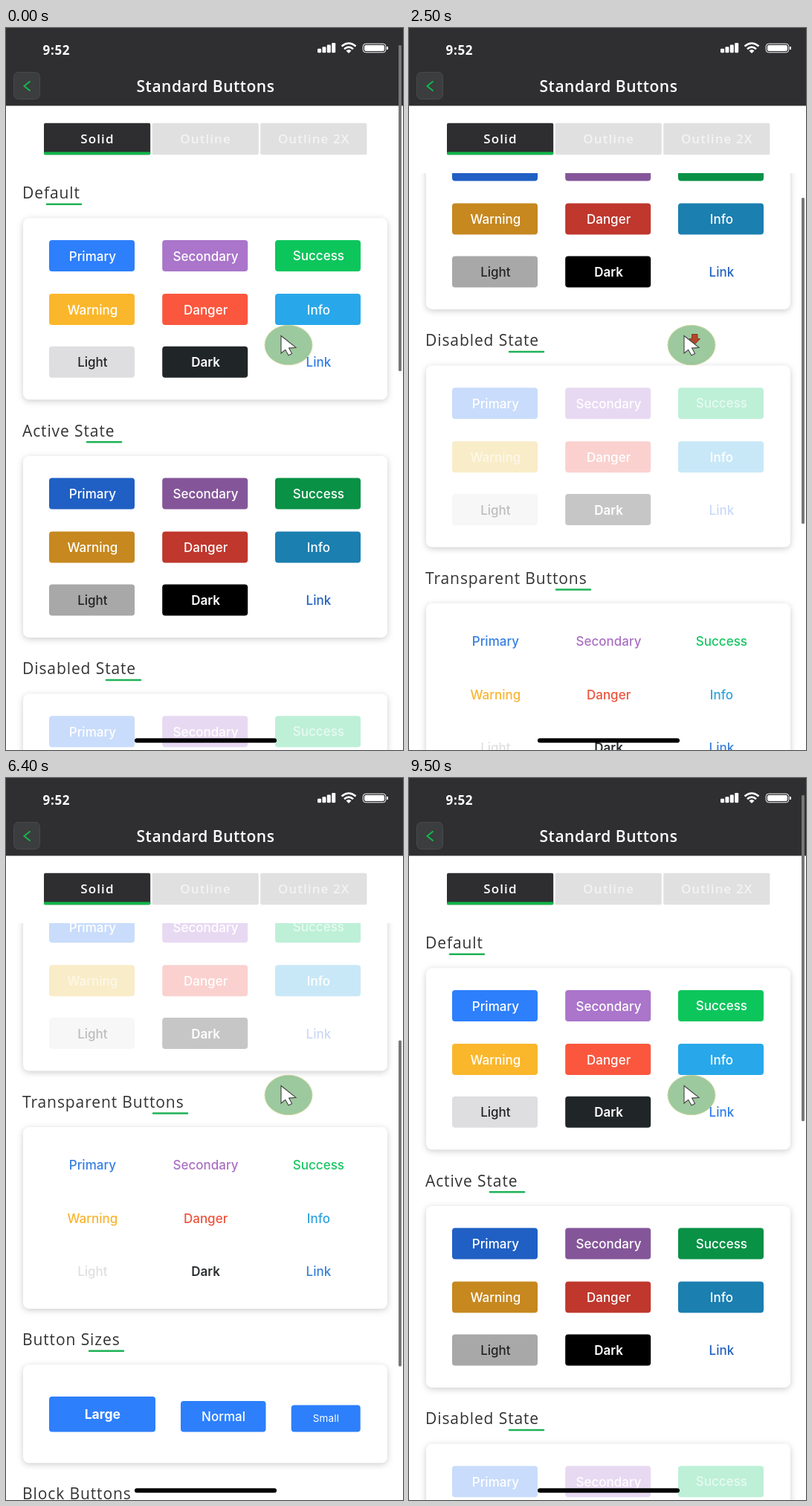
An HTML page for the animation above (9.6 s loop, 534 by 970 pixels).

```html
<!DOCTYPE html>
<html lang="en">
<head>
<meta charset="utf-8">
<title>Standard Buttons</title>
<style>
  html, body { margin: 0; width: 100%; height: 100%; overflow: hidden; background: #fff; }
  svg { display: block; width: 100%; height: 100%; }
  .heading { font: 400 21px "Open Sans", sans-serif; letter-spacing: .9px; fill: #333; }
  .title { font: 600 21px "Open Sans", sans-serif; letter-spacing: .5px; fill: #fff; }
  .tab { font: 600 17px "Open Sans", sans-serif; letter-spacing: 1.1px; }
  .clock { font: 700 17px "Open Sans", sans-serif; letter-spacing: .7px; fill: #fff; }
  .normal { font: 500 17px Inter, sans-serif; }
  .strong { font: 600 17px Inter, sans-serif; }
  .large { font: 700 17.5px Inter, sans-serif; }
  .small { font: 400 13.4px Inter, sans-serif; letter-spacing: .2px; }
  .mid { text-anchor: middle; }
  .card { fill: #fff; filter: drop-shadow(0 2px 4px rgba(0, 0, 0, .2)); }
</style>
</head>
<body>
<svg viewBox="0 0 534 970" preserveAspectRatio="none">
  <defs><clipPath id="view"><rect y="195" width="534" height="775"/></clipPath></defs>
  <rect width="534" height="970" fill="#fff"/>
  <g clip-path="url(#view)"><g id="page"></g></g>

  <rect width="534" height="104.5" fill="#2f2f31"/>
  <text class="clock" x="49.5" y="36">9:52</text>
  <g id="signal" fill="#fff"></g>
  <g fill="none" stroke="#fff" stroke-width="2.6">
    <path d="M451.5 24.5Q461 16.5 470.5 24.5M455 28.3Q461 23 467 28.3"/>
    <path d="M457.5 30.5Q461 27.5 464.5 30.5L461 34Z" fill="#fff" stroke="none"/>
    <rect x="480.2" y="21.2" width="30.6" height="11.6" rx="3.5" stroke-width="1"/>
    <path d="M513 25v4" stroke-width="1.8"/>
  </g>
  <rect x="482" y="23" width="27" height="8" rx="2" fill="#fff"/>
  <rect x="10.5" y="59.500" width="35" height="36" rx="6" fill="#3c3d3e" stroke="#48494a"/>
  <path d="M32.5 71.5L24.5 78L32.5 84.5" fill="none" stroke="#12b84c" stroke-width="2"/>
  <text class="title mid" x="268.5" y="86">Standard Buttons</text>
  <g id="tabs"></g>

  <rect id="thumb" x="528" width="4" height="438" rx="1.5" fill="#777"/>
  <ellipse cx="380" cy="426" rx="32" ry="26.7" fill="#9dc99e" stroke="#cfd8a2" style="mix-blend-mode:multiply"/>
  <path id="wheel" d="M380.5 405.500h7.500v6h3.500l-7.200 7.500l-7.300-7.500h3.500z" fill="#b4452a" stroke="#7d3a20"/>
  <path d="M370 413.5V437l5.700-4.700 4.300 7.500 4.600-2.200-4-7.500 9.400-.8Z" fill="#fff" stroke="#444" stroke-width="1.1"/>
  <rect x="173" y="954.2" width="191" height="6" rx="3" fill="#000"/>
</svg>
<script>
const LOOP = 9600, FRAME = 100, MAX_SCROLL = 1076;
const SECTION = 319.6;
const $ = id => document.getElementById(id);
const page = $("page");

function add(parent, tag, attrs, text) {
  const el = document.createElementNS("http://www.w3.org/2000/svg", tag);
  for (const key in attrs) el.setAttribute(key, attrs[key]);
  if (text) el.textContent = text;
  parent.appendChild(el);
  return el;
}

function box(x, y, width, height, fill, rx = 4) {
  return add(page, "rect", { x, y, width, height, rx, fill });
}

function label(text, x, y, fill, cls = "normal", opacity = 1) {
  add(page, "text", { x, y, fill, opacity, class: cls + " mid" }, text);
}

function section(name, y, lineEnd, height) {
  add(page, "text", { class: "heading", x: 22, y: y + 229 }, name);
  add(page, "path", { d: `M${lineEnd - 47} ${y + 236.7}H${lineEnd - 1}`,
    stroke: "#1fb257", "stroke-width": 2.5, "stroke-linecap": "round" });
  box(23, y + 255.3, 490, height, "#fff", 8).setAttribute("class", "card");
}

const names = ["Primary", "Secondary", "Success", "Warning", "Danger", "Info", "Light", "Dark", "Link"];
const centers = [116, 268.2, 420];
const rows = [285, 357, 427.8];

function buttonGrid(y, fills, inks, alphas = {}) {
  names.forEach((name, i) => {
    const cx = centers[i % 3], top = y + rows[Math.floor(i / 3)];
    if (fills[i]) box(cx - 58, top, 115, 42, fills[i]);
    const cls = name === "Dark" ? "strong" : "normal";
    label(name, cx + .4, top + (i === 2 ? 26.9 : 27.6), inks[i] || "#fff", cls, alphas[i]);
  });
}

const colors = "#2d7ffc #aa75ca #0cc65c #fbb72b #fa573e #28a8ea #dedee0 #202528".split(" ");
const activeColors = "#2060c4 #845699 #099146 #c6881f #bf372d #1b7fb0 #a8a8a8 #000".split(" ");
const faded = "#c9dcfb #e8d9f2 #bdf0d7 #f9ecc8 #fad1cf #c9e8f7 #f7f7f7 #c6c6c6".split(" ");

section("Default", 0, 102, 244);
buttonGrid(0, colors, { 6: "#222", 8: "#2f7de8" });
section("Active State", SECTION, 156, 244);
buttonGrid(SECTION, activeColors, { 6: "#222", 8: "#2262c0" });
section("Disabled State", SECTION * 2, 182, 244);
buttonGrid(SECTION * 2, faded, { 6: "#bdbdbd", 8: "#cad9f6" }, { 2: .65, 3: .6 });
section("Transparent Buttons", SECTION * 3, 245, 244);
buttonGrid(SECTION * 3, [], [
  "#377fe2", "#aa70c4", "#18c663", "#f9b532", "#ee533c", "#2ea2e0", "#dedfe1", "#2b2e30", "#3880d8"
]);

const BLUE = colors[0];
section("Button Sizes", 1278, 159, 132);
const sizes = [
  { name: "Large", cls: "large", height: 47.5, x: 58, width: 143, blockTop: 1771 },
  { name: "Normal", cls: "normal", height: 41.5, x: 235, width: 114.5, blockTop: 1846 },
  { name: "Small", cls: "small", height: 36, x: 383.7, width: 93, blockTop: 1914 }
];
section("Block Buttons", 1485, 173, 240.5);
for (const { name, cls, height, x, width, blockTop } of sizes) {
  const dy = height / 2 + (cls === "small" ? 4.7 : 6.5);
  box(x, 1623.4 - height, width, height, BLUE);
  label(name, x + width / 2 + .3, 1623.4 - height + dy, "#fff", cls);
  box(71, blockTop, 393, height, BLUE, 5);
  label(name, 268, blockTop + dy, "#fff", cls);
}

for (let i = 0; i < 4; i++) {
  const height = 5.5 + i * 2.6;
  add($("signal"), "rect", { x: 419 + i * 6.4, y: 33.3 - height, width: 5, height, rx: 1.2 });
}

["Solid", "Outline", "Outline 2X"].forEach((name, i) => {
  const x = 51 + i * 145.6, tabs = $("tabs");
  add(tabs, "rect", { x, y: 127.7, width: 143.2, height: 42.5, rx: 2, fill: i ? "#e0e0e1" : "#2e2e30" });
  if (!i) add(tabs, "rect", { x, y: 166.5, width: 143.2, height: 3.8, rx: 1, fill: "#10b64a" });
  add(tabs, "text", { class: "tab mid", x: x + 72, y: 154.7, fill: i ? "#f3f3f3" : "#fff" }, name);
});

// Scroll stops as [time, offset], joined by a monotone cubic curve.
const stops = [[0, 0], [800, 0], [1800, 291], [1900, 291], [3300, 785], [3700, 890], [3800, 890],
  [4300, MAX_SCROLL], [5800, MAX_SCROLL], [6400, 745], [7800, 91], [8300, 0], [LOOP + FRAME, 0]];

function rate(i) {
  const [a, b] = [stops[i], stops[i + 1]];
  return a && b ? (b[1] - a[1]) / (b[0] - a[0]) : 0;
}

function slope(i) {
  const before = rate(i - 1), after = rate(i);
  return before * after > 0 ? 2 * before * after / (before + after) : 0;
}

function scrollAt(t) {
  const i = stops.findIndex((stop, n) => n && t < stop[0]) - 1;
  const [t0, y0] = stops[i], [t1, y1] = stops[i + 1];
  const span = t1 - t0, u = (t - t0) / span, v = 1 - u;
  return v * v * ((1 + 2 * u) * y0 + u * span * slope(i)) +
    u * u * ((3 - 2 * u) * y1 - v * span * slope(i + 1));
}

function draw(ms) {
  const t = Math.floor(ms % LOOP / FRAME) * FRAME;
  page.setAttribute("transform", `translate(0 ${-Math.round(scrollAt(t))})`);
  // The scrollbar runs slightly ahead of the content.
  $("thumb").setAttribute("y", 23 + scrollAt(t + 30) * 486 / MAX_SCROLL);
  $("wheel").setAttribute("visibility", t >= 900 && t < 4900 ? "visible" : "hidden");
  $("wheel").setAttribute("transform", `translate(0 ${Math.min(6, t % 300 * .06)})`);
}

const start = performance.now();
function tick() {
  draw(performance.now() - start);
  requestAnimationFrame(tick);
}
tick();
</script>
</body>
</html>
```
